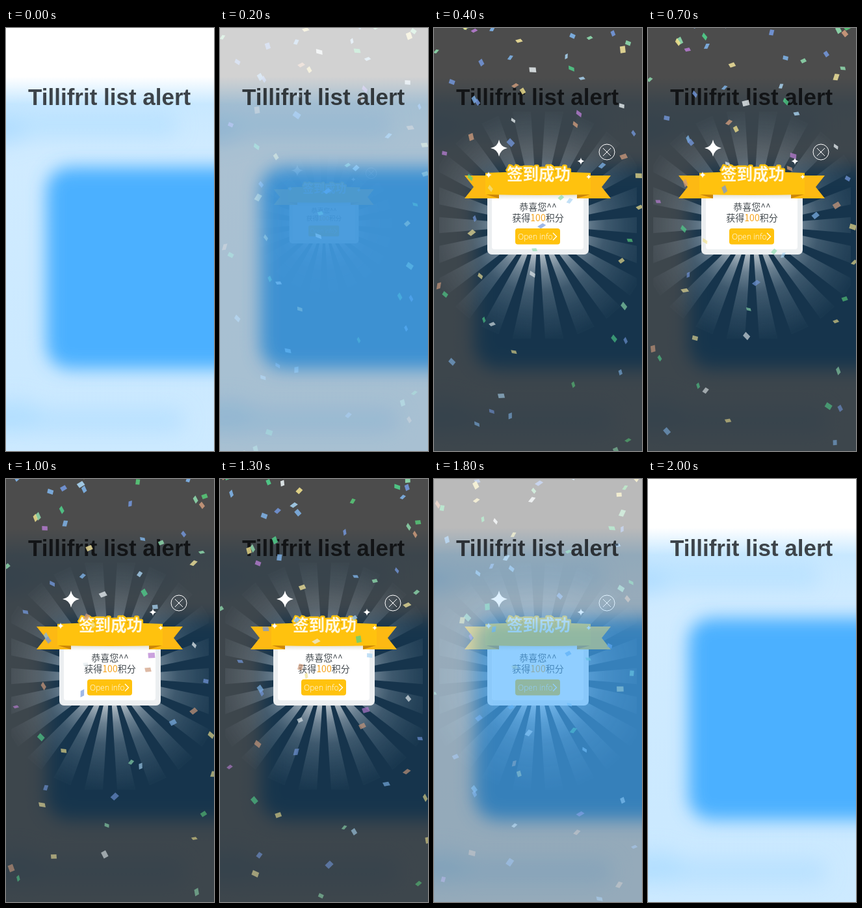
Write an HTML page that moves like this. It is 320x648 px and loops after 2100 ms.

```html
<!DOCTYPE html>
<html lang="en">
<head>
<meta charset="utf-8">
<title>Sign toast</title>
<style>
  html, body { margin: 0; width: 100%; height: 100%; overflow: hidden; background: #fff; }
  svg { display: block; width: 100%; height: 100%; }
  .title { font: bold 35px "Liberation Sans", Arial, sans-serif; fill: #3d444a; }
  .cjk { font-family: "Noto Sans CJK SC", "Noto Sans CJK", "Noto Sans", sans-serif; text-anchor: middle; }
  .banner { font-size: 24.5px; font-weight: 700; fill: #fff9e0; stroke: #ffc20e; stroke-width: 5px;
            stroke-linejoin: round; paint-order: stroke; }
  .line { font-size: 14px; fill: #444b50; }
  .button { font: 300 12px "Open Sans", "Noto Sans", sans-serif; fill: #fff; }
</style>
</head>
<body>
<svg viewBox="0 0 320 648">
  <defs>
    <filter id="soft" x="-50%" y="-50%" width="200%" height="200%"><feGaussianBlur stdDeviation="13.5"/></filter>
    <filter id="mist" x="-50%" y="-100%" width="200%" height="300%"><feGaussianBlur stdDeviation="15"/></filter>
    <linearGradient id="sky" x2="0" y2="1">
      <stop offset=".115" stop-color="#fff"/>
      <stop offset=".18" stop-color="#c8e8ff"/>
      <stop offset=".29" stop-color="#d0ebff"/>
      <stop offset=".8" stop-color="#cbe9ff"/>
      <stop offset="1" stop-color="#cdeaff"/>
    </linearGradient>
    <radialGradient id="glow" gradientUnits="userSpaceOnUse" cx="160" cy="302" r="174">
      <stop offset=".22" stop-color="#fff" stop-opacity=".75"/>
      <stop offset=".42" stop-color="#e8f0f7" stop-opacity=".4"/>
      <stop offset=".6" stop-color="#dce8f2" stop-opacity=".2"/>
      <stop offset=".8" stop-color="#d5e4f0" stop-opacity=".1"/>
      <stop offset="1" stop-color="#cfe0ee" stop-opacity=".02"/>
    </radialGradient>
    <linearGradient id="shade" x2="0" y2="1">
      <stop stop-color="#7a6a30" stop-opacity=".2"/>
      <stop offset="1" stop-color="#7a6a30" stop-opacity="0"/>
    </linearGradient>
    <clipPath id="stage"><rect width="320" height="648"/></clipPath>
    <clipPath id="fan"><rect x="8" y="128" width="304" height="348"/></clipPath>
  </defs>

  <g clip-path="url(#stage)">
    <rect width="320" height="648" fill="url(#sky)"/>
    <g fill="#aedcff" filter="url(#mist)">
      <rect x="-60" y="128" width="325" height="40" rx="20" opacity=".55"/>
      <ellipse cx="-4" cy="157" rx="36" ry="22" opacity=".7"/>
      <rect x="-60" y="582" width="335" height="38" rx="19" opacity=".6"/>
      <ellipse cx="10" cy="592" rx="45" ry="24" opacity=".6"/>
    </g>
    <rect x="62" y="213" width="340" height="309" rx="36" fill="#4bb0ff" filter="url(#soft)"/>
    <text class="title" x="34" y="118">Tillifrit list alert</text>

    <g id="layer">
      <rect width="320" height="648" opacity=".7"/>
      <g id="dialog">
        <path id="rays" fill="url(#glow)" clip-path="url(#fan)"/>
        <rect x="82" y="236" width="156" height="111" rx="7" fill="#eceff1"/>
        <rect x="89" y="240" width="141" height="99" rx="4" fill="#fff"/>
        <rect x="89" y="255" width="141" height="8" fill="url(#shade)"/>
        <path d="M47 226H100V261H47L61 243.500ZM272 226H220V261H272L258 243.500Z" fill="#fdb913"/>
        <path d="M80 255H100V261ZM240 255H220V261Z" fill="#c98509"/>
        <path d="M79 222Q160 218 241 222V255Q160 257 79 255Z" fill="#ffc20e"/>
        <text class="cjk banner" x="161" y="233">签到成功</text>
        <text class="cjk line" x="160" y="279">恭喜您^^</text>
        <text class="cjk line" x="160" y="296">获得<tspan fill="#f5a21b">100</tspan>积分</text>
        <rect x="125" y="307" width="69" height="24.500" rx="4" fill="#ffc20e"/>
        <text class="button" x="129" y="324">Open info</text>
        <g fill="none" stroke="#fff">
          <path d="M183 314L188.500 319.500L183 325" stroke-width="1.300"/>
          <circle cx="266" cy="190" r="12"/>
          <path d="M260 184L272 196M272 184L260 196"/>
        </g>
        <path id="sparkles" fill="#fff"/>
      </g>
      <g id="confetti"></g>
    </g>
  </g>
</svg>
<script>
const LOOP = 2100, STEP = 100, HEIGHT = 648, PIECES = 66;
const COLOURS = ["#4fd08a", "#f1e39a", "#7397dc", "#b57bd0", "#a9d4f2", "#cf9b7c", "#8fdcae", "#e6edf0", "#57c878", "#efe08c", "#7fb4ea"];
const byId = id => document.getElementById(id);
const layer = byId("layer"), dialog = byId("dialog");

function ease(time, start, end) {
  const p = Math.min(1, Math.max(0, (time - start) / (end - start)));
  return (1 - Math.cos(Math.PI * p)) / 2;
}

function makeRandom(seed) {
  return () => (seed = (seed * 16807) % 2147483647) / 2147483647;
}

function rayPath(count, radius) {
  const slice = 2 * Math.PI / count;
  const point = angle => `${160 + radius * Math.sin(angle)} ${302 + radius * Math.cos(angle)}`;
  return Array.from({ length: count }, (_, i) => {
    const middle = (i + .5) * slice;
    return `M160 302L${point(middle - slice * .28)}L${point(middle + slice * .28)}Z`;
  }).join("");
}

function starPath(x, y, r) {
  const k = r * .15;
  return `M${x} ${y - r}Q${x + k} ${y - k} ${x + r} ${y}Q${x + k} ${y + k} ${x} ${y + r}` +
    `Q${x - k} ${y + k} ${x - r} ${y}Q${x - k} ${y - k} ${x} ${y - r}Z`;
}

byId("rays").setAttribute("d", rayPath(22, 178));
byId("sparkles").setAttribute("d",
  starPath(100, 184, 13) + starPath(84, 225, 5) + starPath(226, 204, 5.5) + starPath(238, 228, 4));

const random = makeRandom(4817);
random();
const pieces = Array.from({ length: PIECES }, (_, i) => {
  const node = document.createElementNS("http://www.w3.org/2000/svg", "polygon");
  node.setAttribute("points", "-5.5,-2 0.5,-6 5.5,2 -0.5,6");
  node.setAttribute("fill", COLOURS[Math.floor(random() * COLOURS.length)]);
  byId("confetti").append(node);
  return {
    node, x: random() * 320, phase: (i + random()) / PIECES, drift: random() * 30 - 15,
    angle: random() * 360, spin: random() * 160 - 80, size: .8 + random() * .35
  };
});

// Pieces speed up and fade as they fall, so they lie denser near the top.
function drawPiece(piece, time) {
  const fall = (piece.phase + time / 3000) % 1;
  const x = piece.x + piece.drift * fall;
  const y = HEIGHT * 1.03 * fall ** 1.7 - 8;
  const angle = piece.angle + piece.spin * time / 1000;
  const tilt = .8 + .2 * Math.sin(time / 240 + piece.angle);
  piece.node.setAttribute("opacity", .95 - .4 * fall);
  piece.node.setAttribute("transform",
    `translate(${x} ${y}) rotate(${angle}) scale(${piece.size * tilt} ${piece.size})`);
}

function draw(time) {
  const enter = ease(time, 100, 400);
  layer.setAttribute("opacity", enter * (1 - ease(time, 1530, 2000)));
  dialog.setAttribute("opacity", enter);
  dialog.setAttribute("transform",
    `translate(160 293) scale(${.58 + .42 * enter}) translate(-160 -293)`);
  pieces.forEach(piece => drawPiece(piece, time));
}

const start = performance.now();
function tick() {
  const time = (performance.now() - start) % LOOP;
  draw(Math.floor(time / STEP) * STEP);
  requestAnimationFrame(tick);
}
tick();
</script>
</body>
</html>
```
